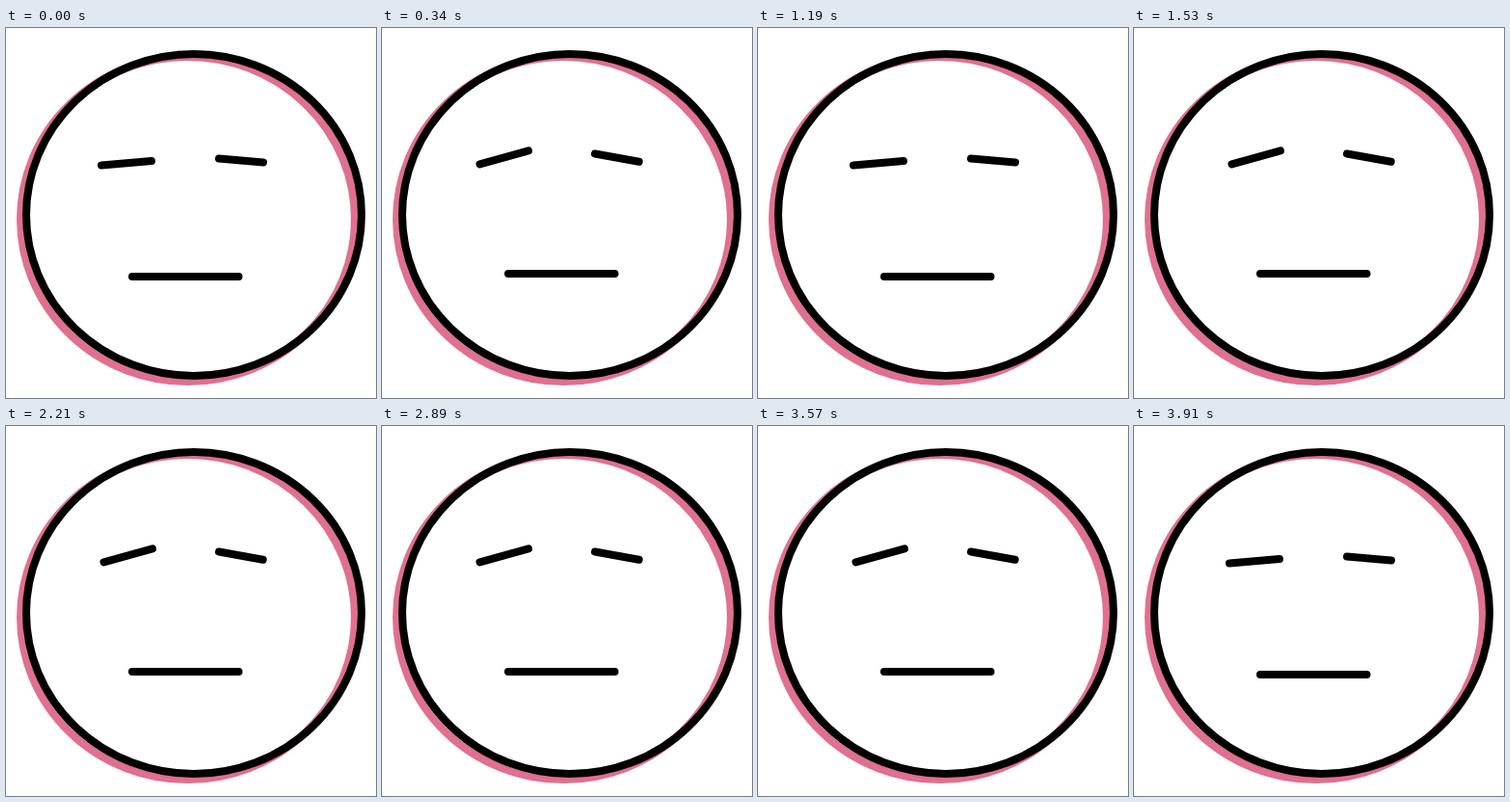
Animation, 384 px wide and 384 px high, one loop 4.08 s. Source, as an HTML page:

```html
<!DOCTYPE html>
<html lang="en">
<head>
<meta charset="utf-8">
<title>Face</title>
<style>
html, body { margin: 0; width: 100%; height: 100%; overflow: hidden; background: #fff; }
svg { display: block; width: 100vw; height: 100vh; }
</style>
</head>
<body>
<svg viewBox="0 0 384 384" fill="none" stroke="#000" stroke-width="8" stroke-linecap="round">
  <ellipse cx="188.5" cy="198.5" rx="173.5" ry="168.5" stroke="#e0708f"/>
  <ellipse cx="195" cy="194" rx="174" ry="167"/>
  <path id="face"/>
</svg>
<script>
const STEP = 170;
// left brow, right brow, mouth
const rest = "M99 142.5L151 138M221 135.5L267 139.5M131 258H241.5";
const raised = "M101.5 141.3L152 127.3M221 130.5L266.7 138.7M131 255H241.5";
const poses = [rest, raised, raised, rest];
const face = document.getElementById("face");

function draw() {
  const step = Math.floor(performance.now() / STEP);
  face.setAttribute("d", poses[step % poses.length]);
  requestAnimationFrame(draw);
}
draw();
</script>
</body>
</html>
```
